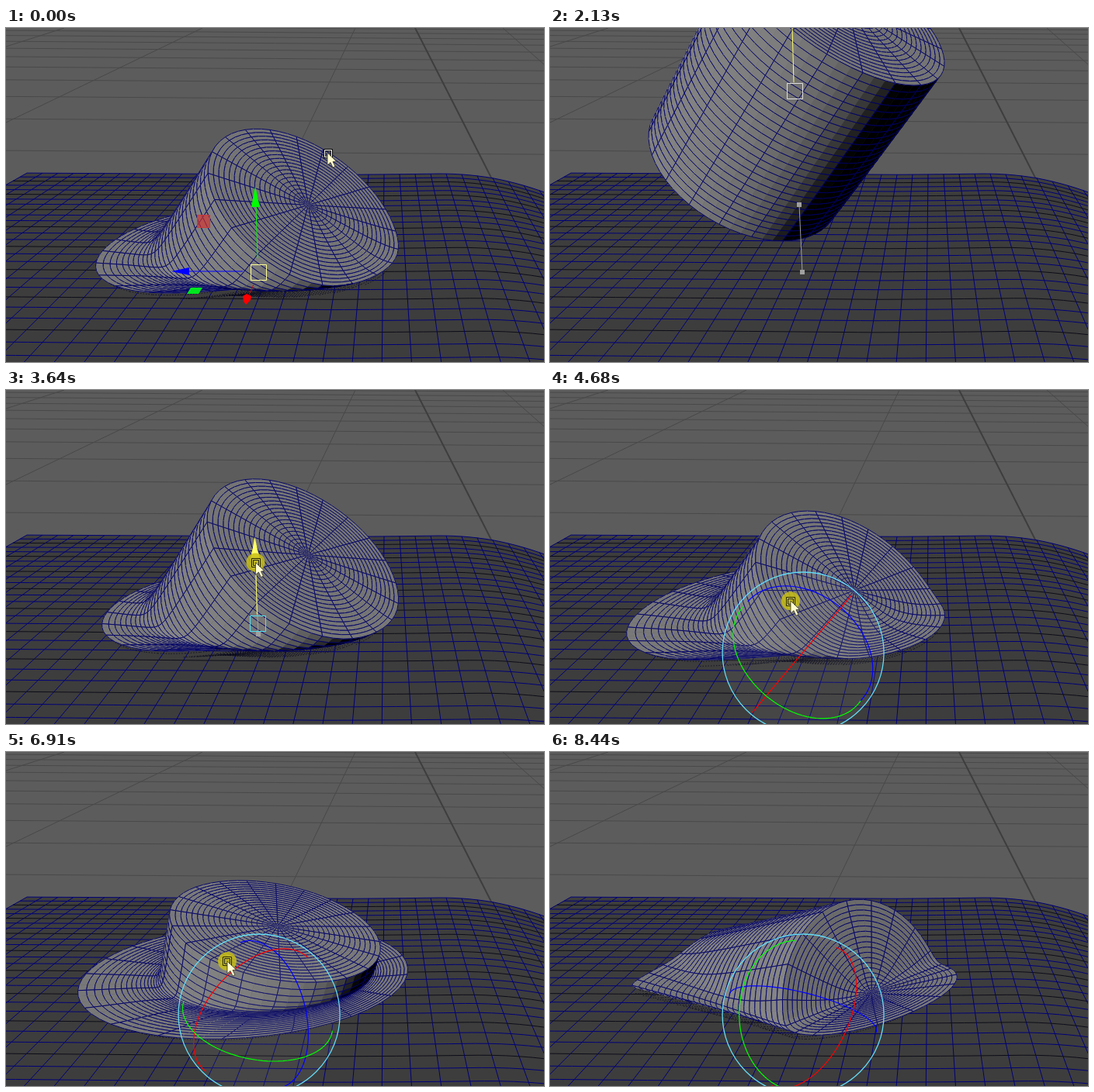
Recreate the animation shown at these times as an HTML page with a canvas. Size 693x431 px, loop 8910 ms.

```html
<!DOCTYPE html>
<html lang="en">
<head>
<meta charset="utf-8">
<title>Soft collision</title>
<style>
  html, body { margin: 0; width: 100%; height: 100%; overflow: hidden; background: #5c5c5c; }
  canvas { display: block; }
</style>
</head>
<body>
<canvas id="stage" width="693" height="431"></canvas>
<script>
const W = 693, H = 431, LOOP = 8910;
const ctx = document.getElementById('stage').getContext('2d');
const COS = 0.9595, SIN = 0.2817;
const EYE = [0, 2.904, 0], LIGHT = [-0.25, 0.632, -0.73];
const FLOOR = 0.26, SOFT = 0.13, PUSH = 0.3, CAP_BULGE = 0.3;
const SECTORS = 60, WIRE_STEP = 3, CAP_RINGS = 20, SIDE_RINGS = 26;
const WIRE = '#000068', GROUND_WIRE = '#000078';

// Keyframes: [time, ...values]
const HEIGHT = [
  [0, 0], [1010, 0], [1630, 1.9], [1850, 2], [2130, 1.806], [2730, 0.87],
  [2950, 0.431], [3350, -0.38], [3640, 0.12], [3950, -0.36], [4300, -0.2]
];
const AXIS = [
  [4650, 0.535, 0.784, -0.312], [5440, 0.53, -0.407, -0.745], [5580, 0.53, -0.407, -0.745],
  [6910, 0.234, 0.961, -0.146], [8170, 0.72, 0.33, -0.61]
];
const SIDE = [
  [4650, 0.75, -0.633, -0.186], [5440, 0.58, -0.46, 0.67], [5580, 0.58, -0.46, 0.67],
  [6910, 0.66, -0.31, -0.69], [8170, 0.74, -0.52, 0.37]
];
const POINTER = [[60, 414, 161], [940, 321, 235]];
const ROTATE_POINTER = [
  [4300, 322, 260], [4610, 310, 272], [4680, 310, 272], [5440, 301, 385], [5580, 301, 385],
  [6910, 285, 270], [8170, 247, 261], [8440, 630, 450]
];

function track(keys, time) {
  const next = keys.findIndex(k => k[0] > time);
  if (next === 0) return keys[0].slice(1);
  if (next < 0) return keys[keys.length - 1].slice(1);
  const a = keys[next - 1], b = keys[next], f = (time - a[0]) / (b[0] - a[0]);
  return a.slice(1).map((v, i) => v + (b[i + 1] - v) * f);
}

const sub = (a, b) => [a[0] - b[0], a[1] - b[1], a[2] - b[2]];
const dot = (a, b) => a[0] * b[0] + a[1] * b[1] + a[2] * b[2];
const cross = (a, b) => [a[1] * b[2] - a[2] * b[1], a[2] * b[0] - a[0] * b[2], a[0] * b[1] - a[1] * b[0]];
const unit = a => { const n = Math.hypot(...a) || 1; return a.map(v => v / n); };

function project([x, y, z]) {
  const down = EYE[1] - y, depth = z * COS + down * SIN;
  return [467 + 1000 * x / depth, 215.5 - 1000 * (z * SIN - down * COS) / depth];
}

function path(g, points, color, width = 1) {
  g.beginPath();
  points.forEach(([x, y]) => g.lineTo(x, y));
  g.strokeStyle = color;
  g.lineWidth = width;
  g.stroke();
}

function fillShape(points, color) {
  ctx.beginPath();
  points.forEach(([x, y]) => ctx.lineTo(x, y));
  ctx.fillStyle = color;
  ctx.fill();
}

function fillDisc(x, y, radius, color) {
  ctx.beginPath();
  ctx.arc(x, y, radius, 0, 7);
  ctx.fillStyle = color;
  ctx.fill();
}

function box(x, y, size, color) {
  ctx.strokeStyle = color;
  ctx.lineWidth = 1;
  ctx.strokeRect(Math.round(x - size / 2) + 0.5, Math.round(y - size / 2) + 0.5, size, size);
}

function groundPoint(u, row) {
  const depth = 1 / (1 / 265 - row * 7.1e-5), scale = depth / 265;
  const x = 490 + (20 * u - 463) * scale;
  const drop = 0.52 * Math.max(0, u - 26.4) ** 2;
  const fade = Math.min(1, Math.max(0, (30 - u) / 9));
  return [x, depth - 78 + (drop + 0.005 * x * fade) * scale];
}

function paintBackdrop() {
  const canvas = document.createElement('canvas');
  canvas.width = W;
  canvas.height = H;
  const g = canvas.getContext('2d');
  g.fillStyle = '#5c5c5c';
  g.fillRect(0, 0, W, H);
  for (let k = 0; k < 13; k++) {
    const y = 1 / (0.0042 + 0.00087 * k) - 78;
    path(g, [[0, y - 2], [W, y + 3]], '#494949');
  }
  [[75, 0, 0, 24], [253, 0, 0, 122], [450, 0, 360, 188], [640, 0, 693, 47]]
    .forEach(([a, b, c, d]) => path(g, [[a, b], [c, d]], '#484848'));
  path(g, [[527, 0], [626, 195]], '#3e3e3e', 2);

  const steps = (n, f) => Array.from({ length: n }, (_, i) => f(i));
  const edge = steps(75, i => groundPoint(i / 2, 0));
  g.beginPath();
  edge.forEach(([x, y]) => g.lineTo(x, y));
  g.lineTo(900, 700);
  g.lineTo(-900, 700);
  g.fillStyle = '#3d3d3d';
  g.fill();
  for (let u = 0; u < 37; u++) path(g, steps(30, r => groundPoint(u, r)), GROUND_WIRE);
  for (let r = 0; r < 30; r++) {
    path(g, steps(75, i => groundPoint(i / 2, r)), r % 3 === 2 ? '#0c0c18' : GROUND_WIRE);
  }
  return canvas;
}

const backdrop = paintBackdrop();

// Outline of the cylinder from bottom centre to top centre: [radius, height]
const profile = [];
for (let i = 0; i <= CAP_RINGS; i++) profile.push([i / CAP_RINGS, -1]);
for (let i = 1; i <= SIDE_RINGS; i++) profile.push([1, 2 * i / SIDE_RINGS - 1]);
for (let i = CAP_RINGS - 1; i >= 0; i--) profile.push([i / CAP_RINGS, 1]);

function pose(time) {
  const up = unit(track(AXIS, time)), raw = track(SIDE, time), k = dot(raw, up);
  const right = unit(raw.map((v, i) => v - up[i] * k));
  return { center: [-1.093, track(HEIGHT, time)[0], 7.172], up, right, front: cross(right, up) };
}

// Flatten whatever is under the floor and bulge it outwards
function deform(p, bulge) {
  const h = p[1] - FLOOR, lifted = (h + Math.hypot(h, SOFT)) / 2;
  const push = PUSH * (lifted - h) ** 2;
  return [p[0] + bulge[0] * push, FLOOR + lifted, p[2] + bulge[2] * push];
}

function buildRings({ center, up, right, front }) {
  return profile.map(([radius, s]) => Array.from({ length: SECTORS + 1 }, (_, j) => {
    const a = j / SECTORS * 2 * Math.PI, ca = Math.cos(a) * radius, sa = Math.sin(a) * radius;
    const radial = [0, 1, 2].map(i => right[i] * ca + front[i] * sa);
    const p = deform(center.map((v, i) => v + radial[i] + up[i] * s),
      radial.map((v, i) => v + CAP_BULGE * s ** 3 * up[i]));
    return { p, s: project(p) };
  }));
}

function shade(normal) {
  const tone = Math.round(145 * (1 - Math.exp(-2.8 * Math.max(0, dot(normal, LIGHT)))));
  return `rgb(${tone},${tone},${tone})`;
}

// Dotted fringe where the hidden underside shows through the floor
function drawUnderside(quads) {
  ctx.setLineDash([1.5, 2]);
  ctx.beginPath();
  quads.forEach(([a, b]) => {
    ctx.moveTo(a.s[0], a.s[1] + 8);
    ctx.lineTo(b.s[0], b.s[1] + 8);
  });
  ctx.strokeStyle = '#0a0a1c';
  ctx.lineWidth = 0.8;
  ctx.stroke();
  ctx.setLineDash([]);
}

function drawFace({ q, j, n }) {
  const [a, b, c, d] = q.map(v => v.s);
  ctx.beginPath();
  ctx.moveTo(...a);
  ctx.lineTo(...b);
  ctx.lineTo(...c);
  ctx.lineTo(...d);
  ctx.closePath();
  ctx.fillStyle = ctx.strokeStyle = shade(n);
  ctx.lineWidth = 0.5;
  ctx.fill();
  ctx.stroke();
  ctx.beginPath();
  ctx.moveTo(...a);
  ctx.lineTo(...b);
  ctx.moveTo(...d);
  ctx.lineTo(...c);
  if (j % WIRE_STEP === 0) {
    ctx.moveTo(...a);
    ctx.lineTo(...d);
  } else if (j % WIRE_STEP === WIRE_STEP - 1) {
    ctx.moveTo(...b);
    ctx.lineTo(...c);
  }
  ctx.strokeStyle = WIRE;
  ctx.lineWidth = 0.95;
  ctx.stroke();
}

function drawMesh(body) {
  const rings = buildRings(body), faces = [], under = [];
  for (let i = 0; i < rings.length - 1; i++) {
    for (let j = 0; j < SECTORS; j++) {
      const q = [rings[i][j], rings[i][j + 1], rings[i + 1][j + 1], rings[i + 1][j]];
      const mid = [0, 1, 2].map(k => (q[0].p[k] + q[1].p[k] + q[2].p[k] + q[3].p[k]) / 4);
      const n = unit(cross(sub(q[3].p, q[1].p), sub(q[2].p, q[0].p)));
      const ray = sub(mid, EYE);
      if (dot(n, ray) < 0) faces.push({ q, j, n, far: dot(ray, ray) });
      else if (mid[1] < FLOOR + 0.03) under.push(q);
    }
  }
  drawUnderside(under);
  ctx.lineJoin = 'round';
  faces.sort((a, b) => b.far - a.far).forEach(drawFace);
}

function drawMover([x, y], dragging) {
  const at = (dx, dy) => [x + dx, y + dy];
  if (dragging) {
    path(ctx, [[325, 315], [321, 228]], '#a0a0a0');
    ctx.fillStyle = '#a0a0a0';
    ctx.fillRect(322, 312, 6, 6);
    ctx.fillRect(318, 225, 6, 6);
  } else {
    ctx.fillStyle = 'rgba(215,50,45,.65)';
    ctx.fillRect(x - 79, y - 74, 17, 17);
    box(x - 71, y - 66, 16, '#c83c3c');
    fillShape([at(-87, 20), at(-72, 20), at(-77, 28), at(-92, 28)], '#00e61e');
    path(ctx, [at(-20, -1), at(-89, -1)], '#0000ff');
    fillShape([at(-112, -1), at(-89, -6), at(-89, 4)], '#0000ff');
    path(ctx, [at(-6, 16), at(-12, 29)], '#c01010');
    fillShape([at(-20, 31), at(-15, 28), at(-9, 31), at(-10, 36), at(-16, 42), at(-19, 38)], '#ff0000');
  }
  const color = dragging ? '#ffff66' : '#00ff00';
  path(ctx, [at(-1, dragging ? -11 : -18), at(-3, -84)], color);
  fillShape([at(-4, -111), at(-9, -84), at(2, -84)], color);
  box(x, y, 20, dragging ? (y < 180 ? '#e0e0e0' : '#4fe0f0') : '#ffff96');
}

function drawRotator([x, y], { center, up, right, front }, pressed) {
  if (pressed) fillDisc(x, y, 103, 'rgba(150,150,150,.1)');
  const view = sub(center, EYE);
  const arc = (e1, e2, color) => {
    ctx.beginPath();
    let pen = false;
    for (let k = 0; k <= 96; k++) {
      const a = k / 48 * Math.PI;
      const p = e1.map((v, i) => 0.75 * (v * Math.cos(a) + e2[i] * Math.sin(a)));
      const visible = dot(p, view) < 0;
      const point = project(center.map((v, i) => v + p[i]));
      if (visible && pen) ctx.lineTo(...point);
      else ctx.moveTo(...point);
      pen = visible;
    }
    ctx.strokeStyle = color;
    ctx.lineWidth = 1.2;
    ctx.stroke();
  };
  arc(right, up, '#0000ff');
  arc(up, front, '#ff0000');
  arc(right, front, '#00ff00');
  ctx.beginPath();
  ctx.arc(x, y, 104, 0, 7);
  ctx.strokeStyle = '#64dcf5';
  ctx.lineWidth = 1.3;
  ctx.stroke();
}

function drawPointer(x, y, pressed) {
  if (pressed) fillDisc(x, y, 12, 'rgba(200,190,20,.85)');
  box(x, y, 11, pressed ? '#222200' : '#000000');
  box(x, y, 9, pressed ? '#d8d040' : '#ffffff');
  box(x, y, 7, '#222222');
  const tip = [[0, 0], [0, 16], [4, 12.5], [7, 19], [10, 17.5], [7, 11.5], [11.5, 11]]
    .map(([dx, dy]) => [x + dx, y + dy]);
  fillShape(tip, '#fffbd0');
  path(ctx, [...tip, tip[0]], '#333322', 0.8);
}

function draw(time) {
  const body = pose(time), pivot = project(body.center);
  const dragging = time >= 950 && time < 4300, rotating = time >= 4400;
  const pressed = dragging || (time >= 4610 && time < 8200);
  ctx.drawImage(backdrop, 0, 0);
  drawMesh(body);
  if (rotating) drawRotator(pivot, body, pressed);
  else drawMover(pivot, dragging);
  const [x, y] = time < 950 ? track(POINTER, time)
    : dragging ? [pivot[0] - 3, pivot[1] - 78] : track(ROTATE_POINTER, time);
  // The pointer is hidden once it is dragged out of the viewport
  if (y > 10) drawPointer(x, y, pressed);
}

const start = performance.now();
function tick() {
  draw((performance.now() - start) % LOOP);
  requestAnimationFrame(tick);
}
tick();
</script>
</body>
</html>
```
